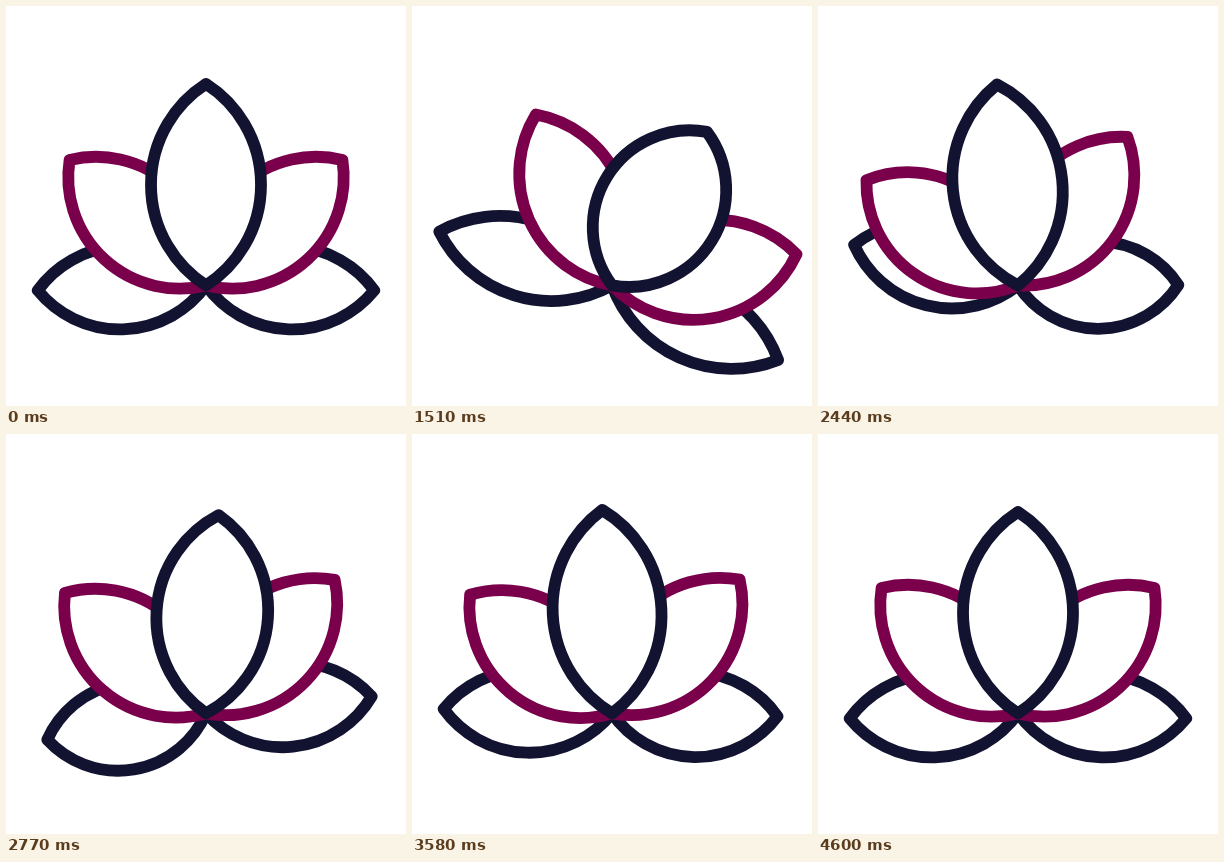
Animation of 400x400 px, one loop 4.63 s. Source, as an HTML page:

```html
<!DOCTYPE html>
<html lang="en">
<head>
<meta charset="utf-8">
<title>Lotus</title>
<style>
html, body { margin: 0; width: 100%; height: 100%; overflow: hidden; background: #fff; }
svg { display: block; width: 100vw; height: 100vh; }
path { fill: #fff; stroke-width: 11.8; stroke-linejoin: round; }
</style>
</head>
<body>
<svg id="stage" viewBox="0 0 400 400"></svg>
<script>
const LOOP = 4630, START = 1030, STEP = 30;
const PUSH = 1000;  // when the petals are pushed aside
const LEAD = 170;   // how far the stretch runs ahead of the turn
const DARK = '#121331', PINK = '#7a004b';
const stage = document.getElementById('stage');

// Shared rebound after the push: [ms since release, share of the full turn]
const REBOUND = [[0, 1], [740, -0.27], [1320, 0.13], [1920, -0.1], [2500, 0]];

const outer = { color: DARK, len: 168.3, half: 41.5, gain: 0.09 };
const inner = { color: PINK, len: 185.3, half: 49.6, gain: 0.01 };
const middle = { color: DARK, len: 201.5, half: 55, gain: -0.12 };

// Back to front; each is pushed by turn degrees until peak, then let go at release
const petals = [
  { ...outer, rest: -91.7, turn: 33, peak: 1930, release: 2110 },
  { ...outer, rest: 91.7, turn: 33.8, peak: 1840, release: 1900 },
  { ...inner, rest: -47.4, turn: 30, peak: 1740, release: 1740 },
  { ...inner, rest: 47.4, turn: 43, peak: 1750, release: 1750 },
  { ...middle, rest: 0, turn: 31.8, peak: 1525, release: 1525 }
];

for (const p of petals) {
  p.keys = [[PUSH, 0], [p.peak, 1], ...REBOUND.map(([t, v]) => [p.release + t, v])];
  p.el = document.createElementNS('http://www.w3.org/2000/svg', 'path');
  p.el.setAttribute('stroke', p.color);
  stage.append(p.el);
}

const ease = u => (1 - Math.cos(Math.PI * u)) / 2;

function swing(keys, t) {
  const i = keys.findIndex(k => k[0] > t);
  if (i < 1) return 0;
  const [t0, v0] = keys[i - 1], [t1, v1] = keys[i];
  return v0 + (v1 - v0) * ease((t - t0) / (t1 - t0));
}

// Rebounds deform a petal twice as strongly as the push
function stretch(p, t) {
  const v = swing(p.keys, t + Math.min(LEAD, (t - PUSH) / 3));
  return 1 + p.gain * (v < 0 ? 2 * v : v);
}

function render(time) {
  const t = time < START ? 0 : START + Math.floor((time - START) / STEP) * STEP;
  for (const p of petals) {
    const s = stretch(p, t);
    const len = p.len * s, half = p.half / s;
    const r = (len * len / 4 + half * half) / (2 * half);
    const angle = p.rest + p.turn * swing(p.keys, t);
    p.el.setAttribute('d', `M0 0A${r} ${r} 0 0 1 0 ${-len}A${r} ${r} 0 0 1 0 0Z`);
    p.el.setAttribute('transform', `translate(200 279.4) rotate(${angle})`);
  }
}

const begin = performance.now();
function tick() {
  render((performance.now() - begin) % LOOP);
  requestAnimationFrame(tick);
}
tick();
</script>
</body>
</html>
```
